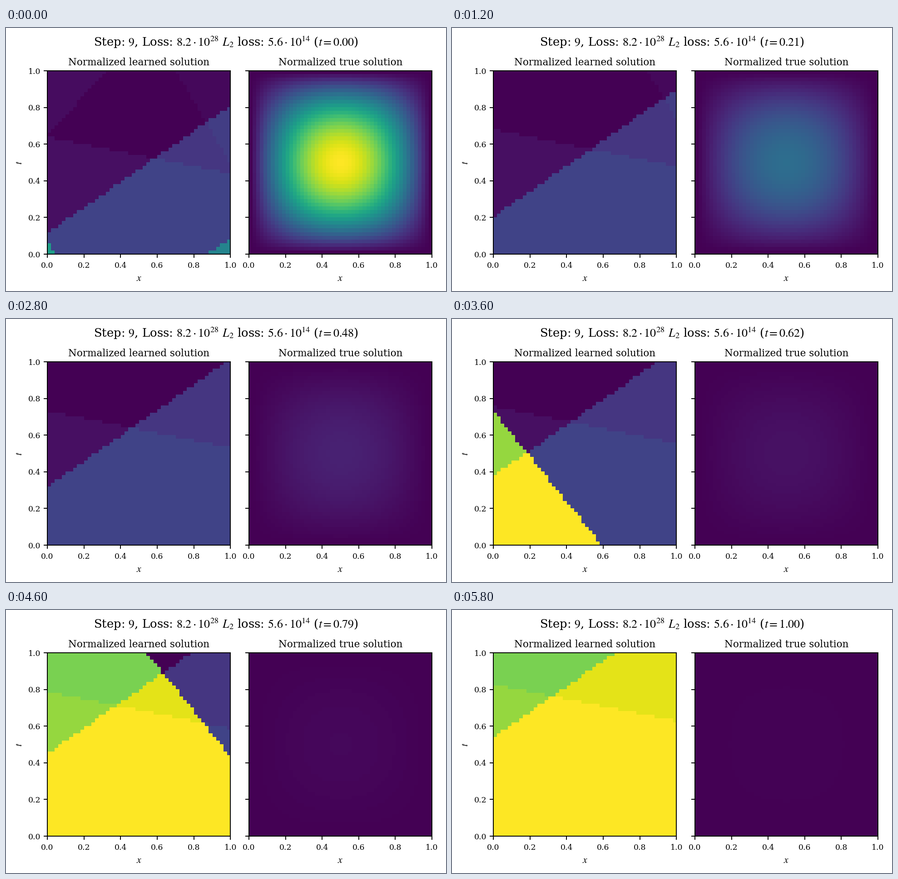
A matplotlib script for the animation above (6000 ms loop, 969x578 px).

```python
import numpy as np
import matplotlib.pyplot as plt
from matplotlib.animation import FuncAnimation

W, H, DPI = 969, 578, 155
STEPS = 30
CELLS = 50

plt.rcParams.update({
    "font.family": "DejaVu Serif",
    "mathtext.fontset": "stix",
    "font.size": 10,
    "axes.titlesize": 10,
    "axes.titlepad": 5.5,
    "axes.linewidth": 0.9,
    "xtick.labelsize": 8,
    "ytick.labelsize": 8,
    "xtick.major.width": 0.9,
    "ytick.major.width": 0.9,
    "xtick.major.pad": 4.3,
})

mid = (np.arange(CELLS) + 0.5) / CELLS
X, Y = np.meshgrid(mid, mid)
wave = np.sin(np.pi * np.linspace(0, 1, CELLS))
BUMP = np.outer(wave, wave)


def learned(t):
    """Sum of half planes whose straight edges drift upwards or away."""
    rising = Y < 0.114 + 0.4224 * t + 0.695 * X
    falling = Y < 0.638 + 0.188 * t - 0.2 * X
    front = Y < 5.427 * t - 2.6387 - 1.233 * X
    top_left = Y > 0.645 + 1.9 * t + 1.09 * X
    top_right = Y > 2.19 + 1.14 * t - 1.7 * X
    low_left = Y < 0.07 - 1.6 * t - 1.5 * X
    low_right = Y < 0.65 * X - 0.565 - 0.72 * t
    return (0.16 * rising + 0.042 * falling + 0.8 * front
            + 0.035 * top_left + 0.02 * top_right
            + 0.36 * low_left + 0.25 * low_right)


def true(t):
    return BUMP * np.exp(-np.pi**2 * t / 2)


def heading(t):
    return (r"Step: $9$, Loss: $8.2 \cdot 10^{28}$ $L_2$ loss: "
            rf"$5.6 \cdot 10^{{14}}$ ($t={t:.2f}$)")


def panel(left, title, field):
    ax = fig.add_axes([left / W, 81 / H, 403.2 / W, 403 / H])
    img = ax.imshow(field, origin="lower", extent=(0, 1, 0, 1), aspect="auto",
                    interpolation="nearest", cmap="viridis", vmin=0, vmax=1)
    ax.set_title(title)
    ax.set_xlabel("$x$")
    return ax, img


# The small surplus keeps the pixel size from rounding down
fig = plt.figure(figsize=((W + 0.01) / DPI, (H + 0.01) / DPI), dpi=DPI,
                 facecolor="white")
ax_l, img_l = panel(91.1, "Normalized learned solution", learned(0))
ax_r, img_r = panel(534.9, "Normalized true solution", true(0))
ax_l.set_ylabel("$t$")
ax_r.tick_params(labelleft=False)
head = fig.text(0.5, (H - 40) / H, heading(0), size=12,
                ha="center", va="baseline")


def update(i):
    t = i / (STEPS - 1)
    img_l.set_data(learned(t))
    img_r.set_data(true(t))
    head.set_text(heading(t))
    return img_l, img_r, head


anim = FuncAnimation(fig, update, frames=STEPS, interval=200,
                     repeat=True, repeat_delay=0, blit=False)
plt.show()
```
